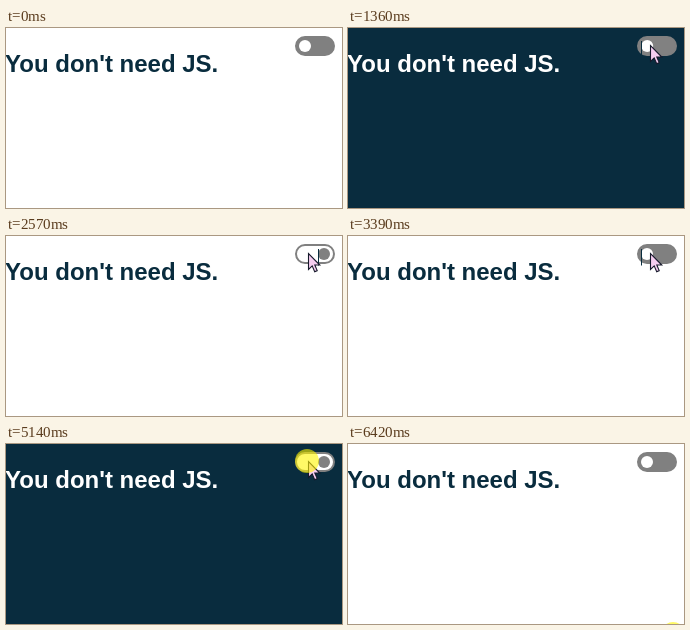
An HTML page that plays this animation: 336 by 180 pixels, repeating every 6550 ms.

```html
<!DOCTYPE html>
<html lang="en">
<head>
<meta charset="utf-8">
<title>Theme switch</title>
<style>
  html, body { margin: 0; width: 100%; height: 100%; overflow: hidden; background: #fff; }
  svg { display: block; width: 100%; height: 100%; }
  text { font: bold 24px "Liberation Sans", Arial, sans-serif; }
</style>
</head>
<body>
<svg viewBox="0 0 336 180">
  <rect id="page" width="336" height="180"/>
  <text id="title" x="-1" y="44">You don't need JS.</text>
  <rect id="track" x="290" y="9" width="38" height="18" rx="9" stroke="#808080" stroke-width="2"/>
  <circle id="knob" cy="18" r="6"/>
  <rect id="caret" y="13" width="1" height="16.5" fill="#092c3e"/>
  <path id="cursor" d="M.5 .5V16.4L4.2 12.9 6.7 18.7 9.2 17.6 6.8 12H11.8Z" fill="#f5cdf0" stroke="#15182a" stroke-width="1.1"/>
  <circle id="halo" r="12" fill="#fff500" fill-opacity=".6"/>
</svg>
<script>
const LOOP = 6550, TICK = 67.6, BLINK = 540, SLIDE = 280;
const NAVY = '#092c3e';
const $ = id => document.getElementById(id);
const [page, title, track, knob, caret, cursor, halo] =
  ['page', 'title', 'track', 'knob', 'caret', 'cursor', 'halo'].map($);

// Mouse down, mouse up
const clicks = [[1230, 1335], [2440, 2570], [3780, 3930], [5140, 5210]];
const lastPress = 6420;

// Pointer route: tick, x, y
const route = [
  [1, 323, 160], [3, 298, 108], [5, 280, 72], [6, 278, 54], [7, 285, 37],
  [8, 299, 22], [9, 311, 10], [10, 319, 1], [11, 312, -1], [13, 305, 9],
  [15, 302, 17], [80, 302, 17], [81, 303, 25], [82, 307, 60],
  [83, 312, 104], [84, 316, 136], [85, 318, 164], [86, 326, 190]
];

const clamp = v => Math.max(0, Math.min(1, v));
const ease = p => p * p * (3 - 2 * p);
const mix = (a, b, p) => a + (b - a) * p;
const gray = p => {
  const v = Math.round(mix(128, 255, p));
  return `rgb(${v},${v},${v})`;
};
const set = (el, attrs) => {
  for (const key in attrs) el.setAttribute(key, attrs[key]);
};
const show = (el, on) => set(el, { visibility: on ? 'visible' : 'hidden' });

function pointer(tick) {
  const i = route.findIndex(p => p[0] >= tick);
  if (i < 0) return route[route.length - 1].slice(1);
  if (i === 0) return route[0].slice(1);
  const a = route[i - 1], b = route[i];
  const p = (tick - a[0]) / (b[0] - a[0]);
  return [mix(a[1], b[1], p), mix(a[2], b[2], p)];
}

function render(t) {
  const tick = Math.floor((t + 4) / TICK), held = tick * TICK;

  const done = clicks.filter(c => t >= c[1]);
  const dark = done.length % 2 === 1;
  set(page, { fill: dark ? NAVY : '#fff' });
  set(title, { fill: dark ? '#fff' : NAVY });

  // The theme flips at once, the switch slides after it
  let on = 0;
  if (done.length) {
    const p = ease(clamp((held - done[done.length - 1][1]) / SLIDE));
    on = dark ? p : 1 - p;
  }
  const cx = mix(299, 318, on);
  set(track, { fill: gray(on) });
  set(knob, { cx, fill: gray(1 - on) });

  const blink = Math.floor((t - clicks[0][0]) / BLINK);
  set(caret, { x: Math.round(cx - 6) });
  show(caret, blink >= 0 && blink % 2 === 0);

  const [x, y] = pointer(tick);
  set(cursor, { transform: `translate(${x} ${y})` });
  show(cursor, tick >= 1 && tick < 86);
  set(halo, { cx: x - 1, cy: y });
  show(halo, t >= lastPress || clicks.some(c => t >= c[0] && t < c[1]));
}

const start = performance.now();
function frame() {
  render((performance.now() - start) % LOOP);
  requestAnimationFrame(frame);
}
frame();
</script>
</body>
</html>
```
